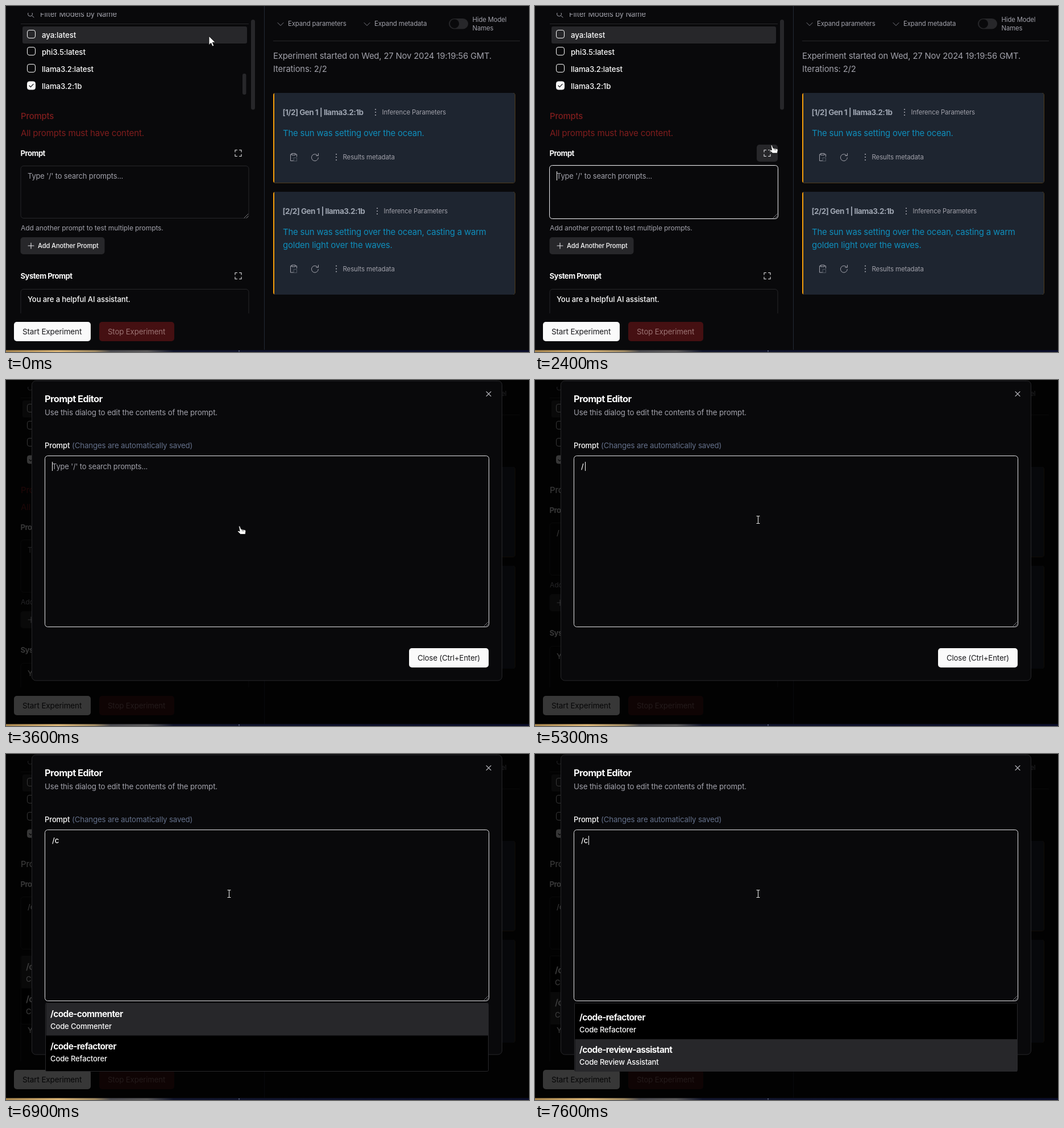
Recreate the animation shown at these times as an HTML page. Size 920 px wide and 609 px high, loop 8000 ms.

```html
<!DOCTYPE html>
<html lang="en">
<head>
<meta charset="utf-8">
<title>Prompt editor demo</title>
<style>
html, body { margin: 0; width: 100%; height: 100%; overflow: hidden; background: #09090b; }
svg { display: block; }
text { font-family: Inter, "Open Sans", sans-serif; letter-spacing: -.011em; white-space: pre; }
.m { font-weight: 500; }
.b { font-weight: 700; letter-spacing: -.04em; }
.i { fill: none; stroke-linecap: round; stroke-linejoin: round; }
</style>
</head>
<body>
<svg id="stage" width="920" height="609" viewBox="0 0 920 609"></svg>
<script>
const LOOP = 8000;
const WHITE = '#fafafa', GREY = '#a1a1aa', LINE = '#27272a', BG = '#09090b', RED = '#7f1d1d', BLUE = '#0f8ebc';
const HINT = "Type '/' to search prompts...";

// y is the middle of the line
const text = (x, y, s, size, fill = WHITE, cls = '', id = '') => {
  const px = cls === 'b' ? size : size * 1.02;
  return `<text ${id && `id="${id}"`} class="${cls}" x="${x}" y="${(y + px * .355).toFixed(2)}" font-size="${px.toFixed(2)}" fill="${fill}">${s}</text>`;
};
const rect = (x, y, w, h, r, fill, more = '') =>
  `<rect x="${x}" y="${y}" width="${w}" height="${h}" rx="${r}" fill="${fill}" ${more}/>`;
const icon = (d, stroke = GREY, w = 1) => `<path class="i" d="${d}" stroke="${stroke}" stroke-width="${w}"/>`;
const group = (id, body, more = '') => `<g id="${id}" ${more}>${body}</g>`;
const dots = (x, y) => [-5, 0, 5].map(d => `<circle cx="${x}" cy="${y + d}" r="1.1" fill="${GREY}"/>`).join('');
const chevron = (x, y) => icon(`M${x - 5} ${y - 2.5}l5 5l5 -5`, '#8b8b93', .9);
const grip = (x, y) => icon(`M${x - 7} ${y}l7 -7M${x - 3} ${y}l3 -3`, '#8a8a8e', .9);
const expand = (x, y) => icon(`M${x - 5.5} ${y - 2}v-3.5h3.5M${x + 2} ${y - 5.5}h3.5v3.5M${x + 5.5} ${y + 2}v3.5h-3.5M${x - 2} ${y + 5.5}h-3.5v-3.5`, '#e4e4e7', 1.1);

const model = (y, name, on) =>
  rect(37.5, y - 8.5, 14, 14, 3.5, on ? WHITE : 'none', `stroke="${WHITE}" stroke-width="1"`) +
  (on ? icon(`M41 ${y - 1.3}l2.4 2.4l4.6 -5`, '#18181b', 1.3) : '') +
  text(63, y, name, 13.1, WHITE, 'm');

const card = (y, h, n, lines, metaX) => {
  const foot = y + h - 45.5;
  return rect(470, y, 425.5, h, 4, '#f59e0b') +
    `<path d="M472 ${y}h420q3.500 0 3.500 4v${h - 8}q0 4 -3.500 4h-420z" fill="#1e2530"/>` +
    text(486.5, y + 34, `[${n}/2] Gen 1 | llama3.2:1b`, 13.5, '#9ca3af', 'b') +
    dots(metaX, y + 34) + text(metaX + 11.5, y + 34, 'Inference Parameters', 11.1, GREY) +
    lines.map((s, i) => text(487, y + 71 + 23 * i, s, 14.58, BLUE)).join('') +
    icon(`M503 ${foot - 5}h-2.500v11.500h5M509 ${foot - 5}h2.500v4M503 ${foot - 6.500}h6v2.800h-6z`) +
    icon(`M506.500 ${foot + 1}h5v6h-5z`, '#5c626c', .8) +
    icon(`M548.500 ${foot - 2.500}a6 6 0 1 0 .9 3.500M549.500 ${foot - 6.500}v4h-4`) +
    dots(581, foot) + text(592.5, foot, 'Results metadata', 11.25, GREY);
};

const popup = (id, x, y, w) =>
  `<svg x="${x}" y="${y}" width="${w}" height="121" id="${id}">` +
  rect(.5, .5, w - 1, 120, 2, '#000') + group(id + 'Rows', '') +
  rect(.5, .5, w - 1, 120, 2, 'none', `stroke="${LINE}"`) + '</svg>';

const left =
  icon('M46.500 14a4 4 0 1 1 -8 0a4 4 0 1 1 8 0M45.500 17l3.500 3', GREY) +
  text(60, 14.5, 'Filter Models by Name', 12.75, GREY) +
  rect(26, 31, 401, 1, 0, LINE) + rect(29, 36, 395, 30, 3, LINE) +
  model(51, 'aya:latest') + model(81, 'phi3.5:latest') + model(111, 'llama3.2:latest') + model(141.500, 'llama3.2:1b', true) +
  rect(416, 119, 6.5, 37, 3, LINE, 'id="listBar"') + rect(431, 24, 7, 158.500, 3.5, LINE) +
  text(26, 194, 'Prompts', 14.6, RED, 'm', 'heading') +
  text(26, 224, 'All prompts must have content.', 14.85, RED, '', 'error') +
  group('lower',
    text(25.500, 259, 'Prompt', 13.1, WHITE, 'b') +
    rect(390, 244, 37, 30, 5, LINE, 'id="hover"') + expand(408.500, 259) +
    rect(26, 281.5, 401, 92, 5, 'none', `stroke="${LINE}"`) + grip(426, 373) +
    rect(25.5, 280.5, 402, 94, 5, 'none', 'id="ring" stroke="#e4e4e7"') +
    text(38, 299.5, HINT, 12.7, GREY, '', 'hint') +
    rect(38, 291, 1, 16, 0, WHITE, 'id="caret"') +
    text(26, 391, 'Add another prompt to test multiple prompts.', 11.86, GREY) +
    rect(25.500, 407, 148, 30, 5, LINE) + icon('M39 422h10M44 417v10', '#e4e4e7', 1.1) +
    text(56, 422, 'Add Another Prompt', 10.95, WHITE, 'm') +
    text(25.500, 475.5, 'System Prompt', 13.1, WHITE, 'b') + expand(408.500, 475) +
    rect(26, 498.5, 401, 93, 5, 'none', `stroke="${LINE}"`) +
    text(38, 516, 'You are a helpful AI assistant.', 12.88, WHITE, 'm')) +
  popup('backList', 26, 355, 402);

const right =
  rect(454, 0, 1, 605, 0, '#232a35') +
  chevron(483, 32) + text(496, 31, 'Expand parameters', 11.18, GREY) +
  chevron(635, 32) + text(648, 31, 'Expand metadata', 11.22, GREY) +
  rect(779, 22, 34, 18.500, 9.25, LINE) + `<circle cx="789" cy="31.200" r="8" fill="${BG}"/>` +
  text(820.500, 23.5, 'Hide Model', 11.1, GREY) + text(820.500, 38.5, 'Names', 11.1, GREY) +
  rect(470, 61, 434, 1, 0, LINE) +
  text(470, 88, 'Experiment started on Wed, 27 Nov 2024 19:19:56 GMT.', 14.55, GREY) +
  text(470, 111, 'Iterations: 2/2', 14.5, GREY) +
  card(153, 158.500, 1, ['The sun was setting over the ocean.'], 650) +
  card(327, 181, 2, ['The sun was setting over the ocean, casting a warm', 'golden light over the waves.'], 653);

const buttons =
  rect(14, 556, 135, 34, 5, WHITE) + text(29, 573.500, 'Start Experiment', 13.25, '#18181b') +
  rect(164, 556, 132, 34, 5, '#451012') + text(179, 573.500, 'Stop Experiment', 13, '#9c7474');

const dialog =
  rect(0, 0, 920, 605, 0, '#000', 'opacity=".78"') +
  rect(45.5, 1.5, 827, 527.500, 7, BG, `stroke="${LINE}"`) +
  text(68, 33, 'Prompt Editor', 16.5, WHITE, 'b') +
  text(68, 57, 'Use this dialog to edit the contents of the prompt.', 13.08, GREY) +
  icon('M845 20.500l8 8M853 20.500l-8 8', '#b4b4ba', 1.1) +
  text(68, 115.5, 'Prompt', 12.8, WHITE, 'm') +
  text(116, 115.5, '(Changes are automatically saved)', 13.02, '#64708a') +
  rect(68.5, 133.5, 781, 301, 5, 'none', 'stroke="#e4e4e7"') + grip(848, 433) +
  text(81, 152.5, HINT, 12.7, GREY, '', 'editText') +
  rect(81, 144, 1, 16, 0, WHITE, 'id="editCaret"') +
  rect(709, 472, 140, 34, 5, WHITE) + text(724, 489, 'Close (Ctrl+Enter)', 12.96, '#18181b') +
  popup('list', 69, 438, 780);

const beam = 'M-2.500 -6.500h2l.5 .5l.5 -.5h2M0 -6v12M-2.500 6.500h2l.5 -.5l.5 .5h2';
const pointers = group('pointer',
  group('arrow', '<path d="M0 0v15.500l3.600 -3.400l2.500 5.800l2.600 -1.100l-2.500 -5.700h5z" fill="#fff" stroke="#111" stroke-width=".9"/>') +
  group('beam', icon(beam, '#000', 2.2) + icon(beam, '#fff', 1)) +
  group('hand', '<path d="M-3.500 -7.500q1.500 -1 2.300 .6l1.700 4.400l6.500 1.200q2 .5 1.800 2.500l-.8 5.300h-8.500l-4.800 -4.600q-.8 -1.600 1.300 -1.500l2.200 .8z" fill="#fff" stroke="#111" stroke-width=".9"/>' +
    icon('M2.500 -1.500v2.500M5 -1v2.300', '#333', .8)));

stage.innerHTML =
  `<defs><clipPath id="pane"><rect y="12" width="454" height="529"/></clipPath>
  <linearGradient id="strip"><stop offset="0" stop-color="#a8864e"/><stop offset=".1" stop-color="#dcb677"/><stop offset=".17" stop-color="#a08a62"/>
  <stop offset=".2" stop-color="#4a4a50"/><stop offset=".27" stop-color="#5a595a"/><stop offset=".32" stop-color="#10142c"/><stop offset="1" stop-color="#0a0d2a"/></linearGradient></defs>` +
  rect(0, 0, 920, 609, 0, BG) + `<g clip-path="url(#pane)">${left}</g>` + right + buttons +
  group('dialog', dialog) +
  rect(0, 605.7, 920, 3.3, 0, 'url(#strip)') + rect(409, 606.500, 2, 1.5, 0, '#6d7690') + pointers;

const el = id => document.getElementById(id);
const show = (id, on) => el(id).setAttribute('visibility', on ? 'inherit' : 'hidden');
const set = (id, name, value) => el(id).setAttribute(name, value);
const within = (t, ...spans) => spans.some(([a, b]) => t >= a && t < b);

// time, x, y; a fourth entry holds the place until the next stop
const path = [
  [0, 357, 53, 1], [300, 225, 322, 1], [900, 223, 314, 1], [1100, 221, 315], [1200, 220.5, 315.5, 1],
  [1700, 238, 312], [1900, 330, 300, 1], [2100, 350, 297], [2600, 464, 223, 1],
  [3000, 413, 265, 1], [3800, 403, 255], [3900, 393, 247, 1], [4100, 392.5, 246, 1], [LOOP, 392.5, 246]
];
function place(t) {
  const i = path.findIndex(p => p[0] > t) - 1;
  const [a, x, y, hold] = path[i], [b, u, v] = path[i + 1];
  const k = hold ? 0 : (t - a) / (b - a);
  return [x + (u - x) * k, y + (v - y) * k];
}

const all = [['/api-documentation-writer', 'API Documentation Writer'], ['/brainstorming-partner', 'Brainstorming Partner']];
const found = [['/code-commenter', 'Code Commenter'], ['/code-refactorer', 'Code Refactorer'], ['/code-review-assistant', 'Code Review Assistant']];
const rows = (items, pick, scroll, w) => items.map(([name, title], i) => {
  const y = 57 * i - scroll;
  return (i === pick ? rect(1.5, y + .5, w - 2.5, 57, 0, LINE) : '') +
    text(9, y + 19.500, name, 15.4, WHITE, 'b') + text(9, y + 41, title, 12.8, WHITE, 'm');
}).join('');

let listKey = '';
function drawLists(t) {
  const open = t >= 5900;
  show('list', open);
  show('backList', open);
  if (!open) return;
  const items = t < 6300 ? all : found;
  const pick = t < 6100 ? -1 : t < 7100 ? 0 : t < 7500 ? 1 : 2;
  const scroll = t < 7500 ? 0 : t < 7600 ? 25 : 50.5;
  const key = [items.length, pick, scroll].join();
  if (key === listKey) return;
  listKey = key;
  el('listRows').innerHTML = rows(items, pick, scroll, 780);
  el('backListRows').innerHTML = rows(items, pick, scroll, 402);
}

function draw(ms) {
  const t = Math.floor(ms / 100) * 100;
  const modal = t >= 3600, typed = t < 5300 ? '' : t < 6300 ? '/' : '/c';
  const [x, y] = place(t);
  const over = x > 390 && x < 427 && y > 244 && y < 274;
  const inBox = x > 26 && x < 427 && y > 281 && y < 375;
  const kind = t >= 3800 || (!modal && inBox) ? 'beam' : over ? 'hand' : 'arrow';
  for (const k of ['arrow', 'beam', 'hand']) show(k, k === kind);
  set('pointer', 'transform', `translate(${x} ${y})`);

  show('listBar', t < 1600);
  show('hover', over && !modal);
  show('ring', within(t, [1100, 3000]));
  show('caret', within(t, [1100, 1700], [2200, 2600]));
  set('heading', 'fill', typed ? WHITE : RED);
  show('error', !typed);
  set('lower', 'transform', `translate(0 ${typed ? -30 : 0})`);

  show('dialog', modal);
  for (const id of ['hint', 'editText']) {
    el(id).textContent = typed || HINT;
    set(id, 'fill', typed ? WHITE : GREY);
    set(id, 'class', typed ? 'm' : '');
  }
  set('editCaret', 'x', [81, 88, 94][typed.length]);
  show('editCaret', modal && within(t, [3600, 3900], [4400, 5000], [5300, 6100], [6300, 6900], [7500, LOOP]));
  drawLists(t);
}

const start = performance.now();
function tick() {
  draw((performance.now() - start) % LOOP);
  requestAnimationFrame(tick);
}
draw(0);
requestAnimationFrame(tick);
</script>
</body>
</html>
```
